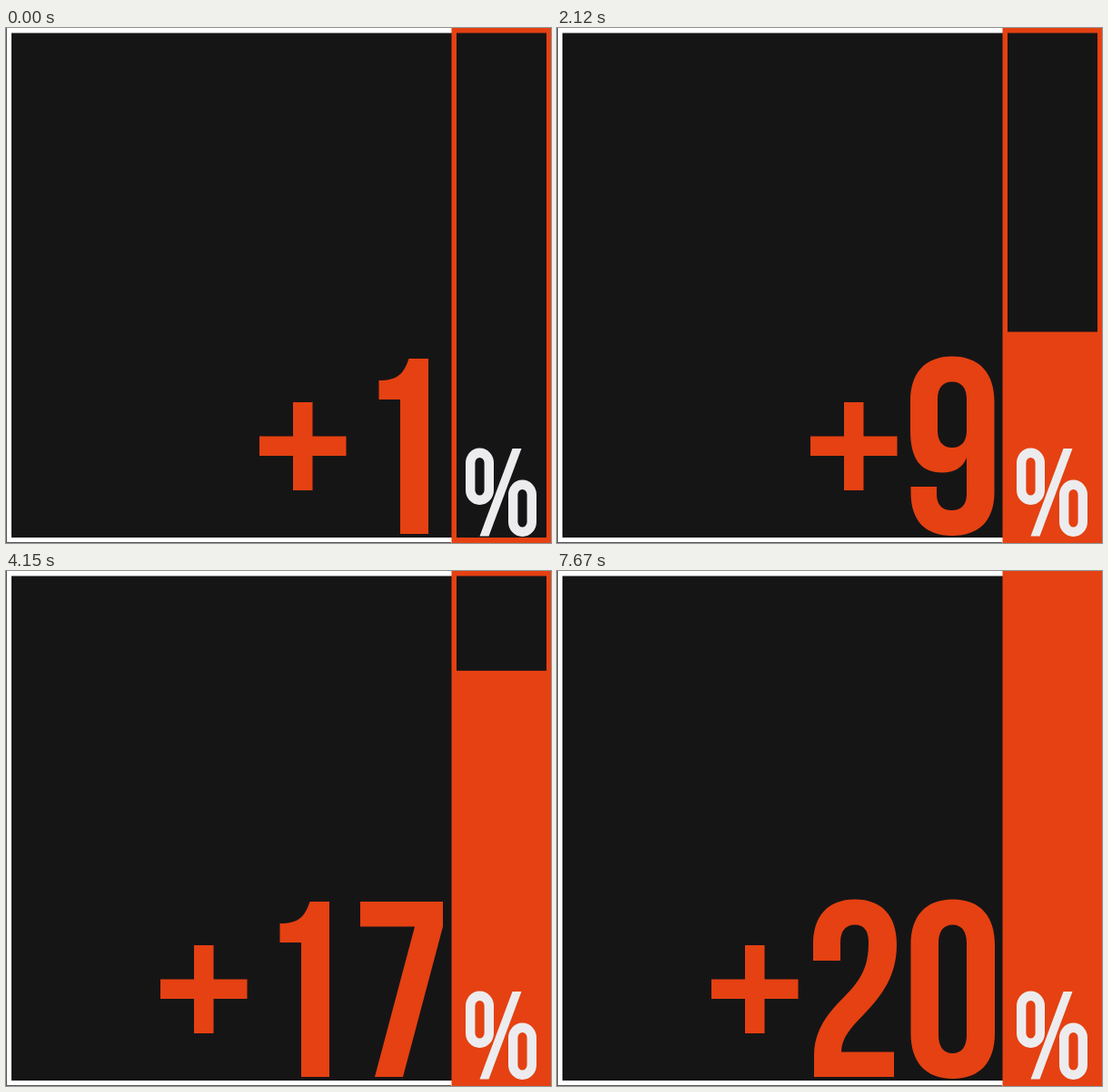
An HTML page for the animation above (7.7 s loop, 600 px wide and 567 px high).

```html
<!DOCTYPE html>
<html lang="en">
<head>
<meta charset="utf-8">
<title>Percentage counter</title>
<style>
  html, body { margin: 0; width: 100%; height: 100%; overflow: hidden; background: #fff; }
  svg { display: block; width: 600px; height: 567px; }
  .accent { fill: #e54112; }
  .dark { fill: #161516; }
  .digit { fill-rule: evenodd; }
</style>
</head>
<body>
<svg viewBox="0 0 600 567" role="img" aria-label="Counter from +1% to +20%">
  <path fill="#555" d="M0 0H1V566H490V567H0Z"/>
  <rect class="dark" x="6" y="5.5" width="485" height="555.5"/>
  <rect class="accent" x="490.5" width="109.5" height="567"/>
  <rect class="dark" id="gap" x="496" y="5.5" width="99"/>
  <g class="accent">
    <path id="plus" d="M316 412H337.5V449.5H374.5V471H337.5V509H316V471H279V449.5H316Z"/>
    <path class="digit" id="tens" transform="translate(-109)"/>
    <path class="digit" id="units"/>
  </g>
  <g fill="none" stroke="#ececee" stroke-width="10.4">
    <rect x="511.2" y="467.8" width="20.6" height="52" rx="10.2" ry="11"/>
    <rect x="558.2" y="502.8" width="20.6" height="52" rx="10.2" ry="11"/>
  </g>
  <path fill="#ececee" d="M557.5 463H567.5L531.5 559.5H521.5Z"/>
</svg>
<script>
const LOOP = 7700, STEP = 255, LAST = 20, TOP = 5.5, BOTTOM = 561;
const get = id => document.getElementById(id);

// Upright capsule with slightly squared round ends
function pill(l, r, t, b, end) {
  const m = (l + r) / 2, k = end * .38, q = (r - l) * .17;
  return `M${l} ${t + end}C${l} ${t + k} ${l + q} ${t} ${m} ${t}S${r} ${t + k} ${r} ${t + end}` +
    `V${b - end}C${r} ${b - k} ${r - q} ${b} ${m} ${b}S${l} ${b - k} ${l} ${b - end}Z`;
}

const nine = 'M389 411C389 380 405 361.5 435 361.5S481.5 380 481.5 411V511' +
  'C481.5 542 465 559 435 559S389.5 542 389.5 511V505H418V513' +
  'C418 525 424 531 434.5 531S451 525 451 513V473C447 484 437 489.5 424 489.5C400 489.5 389 474 389 443Z' +
  pill(419, 451, 389.5, 462, 19);

const glyphs = [
  pill(389.5, 482, 361.5, 559, 50) + pill(420, 451, 389.5, 531, 20),
  'M465 364V557H434V409H410.5V388C432 388 438 380 443.5 364Z',
  'M391 429V411C391 380 407 361.5 437 361.5S483 380 483 411C483 445 468 466 446 489' +
    'C430 505 422 516 422 529.5H480V557H392V533C392 505 408 486 426 468' +
    'C445 449 452 434 452 409C452 396 447 389.5 437 389.5S421 396 421 409V429Z',
  'M389 420V409C389 379 405 361.5 435 361.5S481 379 481 409V417C481 437 474 450 460 456' +
    'C475 462 481 475 481 495V511C481 542 465 559 435 559S389 542 389 511V495H418V513' +
    'C418 525 424 531 434.5 531S451 525 451 512V495C451 478 446 471 433 471H423V443H435' +
    'C446 443 451 437 451 424V413C451 396 446 389.5 434.5 389.5S418 396 418 408V420Z',
  'M440 364H473V493.5H488V522H473V557H443.5V522H385V493.5ZM443.5 421V493.5H413.5Z',
  'M397 364H476V391.5H424L421 437C427 428 436 423 448 423C470 423 481 440 481 470V511' +
    'C481 542 465 559 435 559S390 542 390 511V494.5H419V513C419 525 425 531 435 531S451 525 451 513V469' +
    'C451 457 445 451 435 451S419 457 419 469V475.5H390.5Z',
  nine,
  'M390 364H481V391.5L437 557H406L450 391.5H390Z',
  'M435 361.5C465 361.5 481 378 481 407V414C481 435 474 449 460 456C475 464 481 478 481 500V511' +
    'C481 542 465 559 435 559S389 542 389 511V500C389 478 395 464 410 456' +
    'C396 449 389 435 389 414V407C389 378 405 361.5 435 361.5Z' +
    pill(419.5, 450.5, 389.5, 443, 18) + pill(419.5, 450.5, 471, 531, 18),
  nine
];

function draw(now) {
  const t = now % LOOP;
  const value = Math.min(LAST, 1 + Math.floor(t / STEP));
  const unit = value % 10, ten = Math.floor(value / 10);
  const level = Math.max(TOP, Math.min(BOTTOM, 569.3 - .1107 * t));

  get('gap').setAttribute('height', level - TOP);
  get('units').setAttribute('d', glyphs[unit]);
  get('units').setAttribute('transform', unit === 6 ? 'rotate(180 435.4 460.2)' : '');
  get('tens').setAttribute('d', ten ? glyphs[ten] : '');
  get('plus').setAttribute('transform', `translate(${ten ? -109 : 0})`);
  requestAnimationFrame(tick);
}

const start = performance.now();
const tick = () => draw(performance.now() - start);
tick();
</script>
</body>
</html>
```
